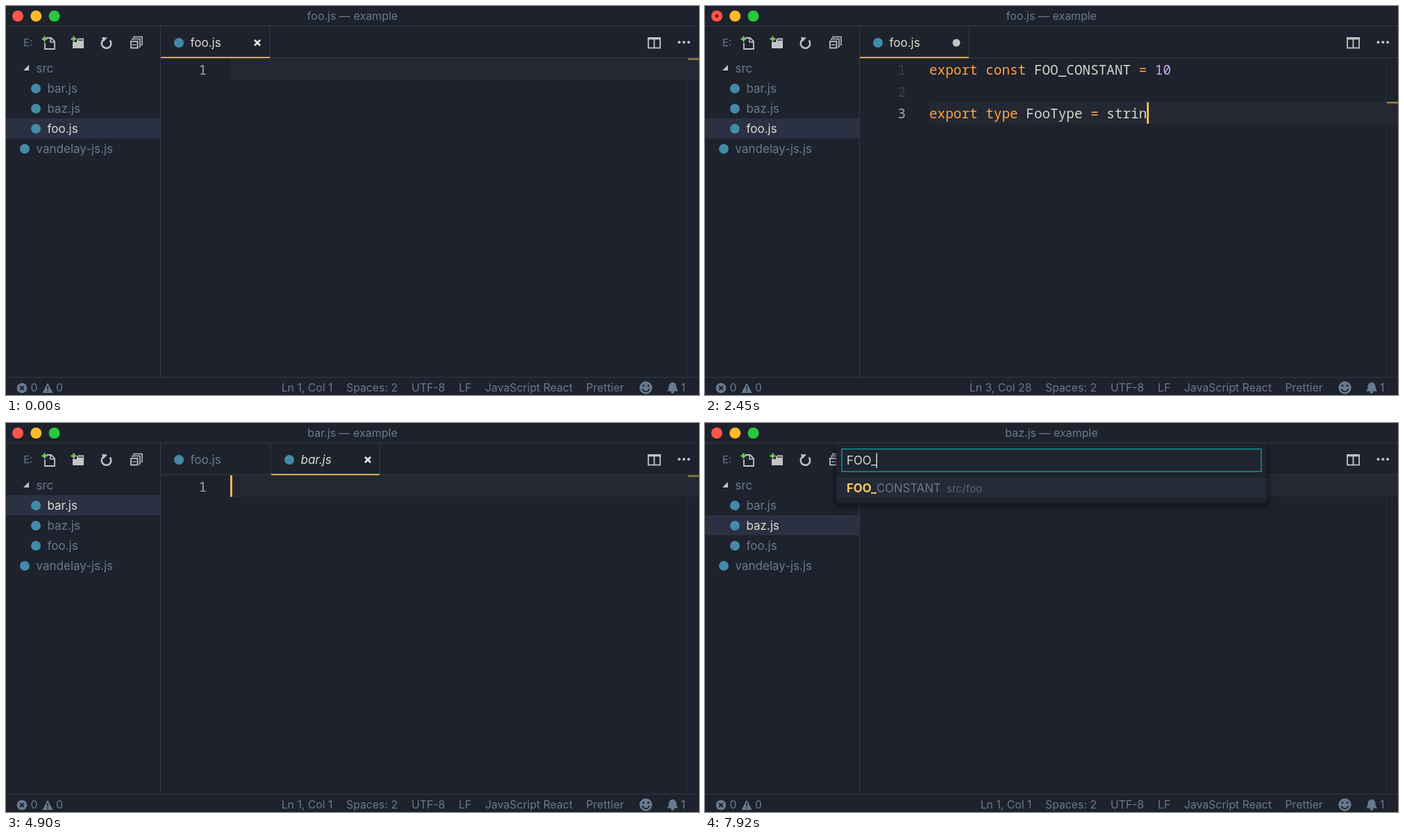
An HTML page with a canvas that plays this animation: 998 by 561 pixels, repeating every 7990 ms.

```html
<!DOCTYPE html>
<html lang="en">
<head>
<meta charset="utf-8">
<title>Editor session</title>
<style>
html, body { margin: 0; width: 100%; height: 100%; overflow: hidden; background: #1e222c; }
canvas { display: block; width: 998px; height: 561px; }
</style>
</head>
<body>
<canvas id="stage" width="998" height="561"></canvas>
<script>
const ctx = document.getElementById('stage').getContext('2d');
const LOOP = 7990, STEP = 70;
const UI = 'Inter, Roboto, sans-serif';
const MONO = '19.35px "Noto Sans Mono", "DejaVu Sans Mono", monospace';
const C = {
  bg: '#1e222c', line: '#242832', border: '#343a46', muted: '#687a90', bright: '#dedcd2',
  icon: '#c3c4c5', accent: '#ffcc5c', file: '#438aa8', green: '#7ccb63',
  selected: '#2b3043', focused: '#3a445a',
  fg: '#d8d6cc', key: '#ffa346', num: '#cda8ff', fn: '#ffd269', str: '#b4ea6e', type: '#57cae9'
};

// Each line: tokens, then [time, typed characters] keys.
const docs = {
  foo: [
    { tokens: [['export', 'key'], [' '], ['const', 'key'], [' FOO_CONSTANT '], ['=', 'key'], [' '], ['10', 'num']],
      keys: [[280, 1], [910, 19], [1050, 25], [1190, 30]] },
    { tokens: [], keys: [] },
    { tokens: [['export', 'key'], [' '], ['type', 'key'], [' FooType '], ['=', 'key'], [' '], ['string', 'type'], ['[]']],
      keys: [[1540, 1], [2450, 27], [2660, 30]] },
    { tokens: [], keys: [] },
    { tokens: [['export', 'key'], [' '], ['default', 'key'], [' () '], ['=>', 'key'], [' '], ['alert', 'fn'], ['('], ["'foo'", 'str'], [')']],
      keys: [[3080, 1], [3990, 31], [4130, 33]] }
  ],
  bar: [
    { tokens: [['export', 'key'], [' '], ['function', 'key'], [' '], ['doBar', 'fn'], ['() {']],
      keys: [[5460, 1], [5950, 21], [6090, 25]] },
    { tokens: [['  ']], keys: [[6160, 2]] },
    { tokens: [['}']], keys: [[6160, 1]] }
  ],
  baz: [{ tokens: [], keys: [] }]
};
const enters = { foo: [1330, 1400, 2800, 2870], bar: [6160], baz: [] };
const exportsList = [['foo', 'src/foo'], ['FOO_CONSTANT', 'src/foo'], ['FooType', 'src/foo'], ['doBar', 'src/bar']];

const between = (t, a, b) => t >= a && t < b;

function typed(keys, t) {
  if (!keys.length || t < keys[0][0]) return 0;
  for (let i = 1; i < keys.length; i++) {
    const [t0, n0] = keys[i - 1], [t1, n1] = keys[i];
    if (t < t1) return Math.round(n0 + (n1 - n0) * (t - t0) / (t1 - t0));
  }
  return keys[keys.length - 1][1];
}

function rect(x, y, w, h, color) {
  ctx.fillStyle = color;
  ctx.fillRect(x, y, w, h);
}
function circle(x, y, r, color) {
  ctx.fillStyle = color;
  ctx.beginPath();
  ctx.arc(x, y, r, 0, 7);
  ctx.fill();
}
function path(points, color, width, closed) {
  ctx.beginPath();
  points.forEach(([x, y]) => ctx.lineTo(x, y));
  if (closed) ctx.closePath();
  if (width) {
    ctx.strokeStyle = color;
    ctx.lineWidth = width;
    ctx.stroke();
  } else {
    ctx.fillStyle = color;
    ctx.fill();
  }
}
function frame(x, y, w, h, color, width) {
  ctx.strokeStyle = color;
  ctx.lineWidth = width;
  ctx.strokeRect(x, y, w, h);
}
// Draws text around a middle line and returns its right edge.
function text(s, x, mid, size, color = C.muted, align = 'left', style = '') {
  ctx.font = `${style} ${size}px ${UI}`;
  ctx.fillStyle = color;
  ctx.textAlign = align;
  ctx.fillText(s, x, mid + size * 0.355);
  return x + ctx.measureText(s).width;
}
function cross(x, y, r, color, width) {
  path([[x - r, y - r], [x + r, y + r]], color, width);
  path([[x - r, y + r], [x + r, y - r]], color, width);
}
function plus(x, y) {
  rect(x - 4, y - 1.2, 8, 2.4, C.green);
  rect(x - 1.2, y - 4, 2.4, 8, C.green);
}

function titleBar(s) {
  ['#ff554b', '#ffba2b', '#28c83f'].forEach((c, i) => circle(17 + i * 26.3, 14.5, 8, c));
  if (s.dirty) circle(17, 14.5, 2.4, '#7d0b08');
  text(`${s.file}.js — example`, 499, 14, 16, C.muted, 'center');
  rect(0, 28, 998, 1, C.border);
}

function sidebar(s) {
  text('E:', 25, 53, 15);
  path([[58, 46], [65, 46], [70, 51], [70, 62], [56, 62], [56, 53]], C.icon, 1.8);
  path([[64, 46], [64, 52], [70, 52]], C.icon, 1.6);
  plus(55.5, 47.5);
  path([[96, 52], [102, 52], [102, 49], [104, 46.5], [112, 46.5], [112, 61], [96, 61]], C.icon);
  rect(104, 48.5, 7, 1.3, C.bg);
  plus(97.5, 47.5);
  ctx.strokeStyle = C.icon;
  ctx.lineWidth = 2.5;
  ctx.beginPath();
  ctx.arc(144.5, 54, 6.8, -0.7, 4.1);
  ctx.stroke();
  path([[138, 45], [146, 45.5], [140.5, 51.5]], C.icon);
  path([[184, 46], [184, 44.5], [196, 44.5], [196, 56], [194.5, 56]], C.icon, 1.5);
  path([[182, 49], [182, 47.5], [193, 47.5], [193, 59], [191.5, 59]], C.icon, 1.5);
  frame(180, 51, 9.5, 9.5, C.icon, 1.8);
  rect(182, 55, 5.5, 1.7, '#78a9d8');

  path([[33, 85], [33, 93], [25, 93]], C.icon);
  text('src', 43.5, 90, 17);
  ['bar', 'baz', 'foo'].forEach((name, i) => {
    const y = 119 + i * 29, on = name === s.file;
    if (on) rect(0, y - 15, 222, 29, s.sideFocus ? C.focused : C.selected);
    circle(43, y, 7, C.file);
    text(name + '.js', 59.5, y, 17, on ? C.bright : C.muted);
  });
  circle(27, 206, 7, C.file);
  text('vandelay-js.js', 43.5, 206, 17);
  rect(222, 29, 1, 506, C.border);
}

function tabs(s) {
  rect(223, 74, 775, 1, C.border);
  s.tabs.forEach((name, i) => {
    const x = [223, 382, 540][i], on = name === s.file;
    const last = i === s.tabs.length - 1;
    const end = last ? [380, 538, 696][i] : [381, 540][i];
    circle(x + 26, 53, 7, C.file);
    text(name + '.js', x + 42.5, 53, 17, on ? C.bright : C.muted, 'left', on && s.preview ? 'italic' : '');
    rect(end - 0.5, 29, 1, 45, C.border);
    if (!on) return;
    rect(x, 73.5, end - x, 1.7, C.accent);
    if (s.dirty) circle(x + 139, 53, 5.5, C.icon);
    else cross(x + 139, 53, 4, '#e4e4e2', 2.6);
  });
  frame(925, 46, 17, 14.5, C.icon, 1.8);
  rect(924, 45, 19, 3.4, C.icon);
  rect(932.6, 46, 1.8, 14, C.icon);
  for (let i = 0; i < 3; i++) circle(969.5 + i * 6.8, 52.3, 2, C.icon);
}

function codeLine(line, n, x0, mid, adv) {
  let at = 0;
  for (const [word, kind = 'fg'] of line.tokens) {
    const part = word.slice(0, Math.max(0, n - at)), x = x0 + at * adv;
    const partial = part.length < word.length && (kind === 'key' || kind === 'type');
    ctx.fillStyle = C[partial ? 'fg' : kind];
    if (part === '=>') {
      path([[x + 1, mid - 2.3], [x + 17, mid - 2.3]], C.key, 1.8);
      path([[x + 1, mid + 3], [x + 17, mid + 3]], C.key, 1.8);
      path([[x + 13.5, mid - 6], [x + 21, mid + 0.3], [x + 13.5, mid + 6.6]], C.key, 1.9);
    } else if (part.trim()) {
      ctx.fillText(part, x, mid + 7);
    }
    at += word.length;
  }
}

function editor(s, t) {
  const top = i => 75 + i * 31.6;
  rect(323, top(s.row), 675, 31.6, C.line);
  rect(981, 75, 1, 460, '#292d37');
  if (!s.sideFocus && !s.palette) rect(982, top(s.row) + (s.row ? 0 : 0.5), 16, 2.2, s.row ? '#b98a43' : '#9e8243');
  ctx.font = MONO;
  const adv = ctx.measureText('0').width;
  const lines = docs[s.file];
  const shown = s.file === 'bar' && s.row ? 3 : s.row + 1;
  for (let i = 0; i < shown; i++) {
    const mid = top(i) + 17, n = typed(lines[i].keys, t);
    ctx.font = MONO;
    ctx.textAlign = 'right';
    ctx.fillStyle = i === s.row ? '#a3a7ad' : '#3b4250';
    ctx.fillText(i + 1, 289, mid + 7);
    ctx.textAlign = 'left';
    codeLine(lines[i], n, 323, mid, adv);
    // Brackets and quotes close themselves while typing.
    if (s.file === 'foo' && i === 4 && between(n, 27, 33)) {
      const quote = between(n, 28, 32) ? "'" : '';
      ctx.fillStyle = C.str;
      ctx.fillText(quote, 323 + n * adv, mid + 7);
      ctx.fillStyle = C.fg;
      ctx.fillText(')', 323 + (n + quote.length) * adv, mid + 7);
    }
    if (i === s.row && s.cursor) rect(323 + n * adv, top(i) + 0.5, 2.7, 31, C.accent);
  }
}

function statusBar(s, t) {
  rect(0, 535, 998, 1, C.border);
  const size = 15.8, mid = 550;
  const label = (str, x, align) => text(str, x, mid, size, C.muted, align);
  circle(23, 551, 7.3, C.muted);
  cross(23, 551, 2.8, C.bg, 2);
  label('0', 35.5);
  path([[60, 543.5], [67.5, 558], [52.5, 558]], C.muted);
  rect(59.2, 548, 1.7, 5, C.bg);
  rect(59.2, 554.5, 1.7, 1.7, C.bg);
  label('0', 72);
  const col = typed(docs[s.file][s.row].keys, t) + 1;
  label(`Ln ${s.row + 1}, Col ${col}`, 470.5, 'right');
  label('Spaces: 2', 490);
  label('UTF-8', 584);
  label('LF', 652);
  label('JavaScript React', 690);
  label('Prettier', 835.5);
  circle(921.5, 550.5, 9.2, C.muted);
  circle(918, 547.5, 1.5, C.bg);
  circle(925, 547.5, 1.5, C.bg);
  ctx.strokeStyle = C.bg;
  ctx.lineWidth = 1.7;
  ctx.beginPath();
  ctx.arc(921.5, 551, 5, 0.2, 2.94);
  ctx.stroke();
  ctx.fillStyle = C.muted;
  ctx.beginPath();
  ctx.moveTo(952, 555.5);
  ctx.quadraticCurveTo(954.5, 553, 954.5, 548.5);
  ctx.arc(960, 548, 5.3, Math.PI, 0);
  ctx.quadraticCurveTo(965.5, 553, 968, 555.5);
  ctx.fill();
  circle(960, 556.5, 2.4, C.muted);
  label('1', 972);
}

function palette(query) {
  const items = exportsList.filter(([name]) => name.toLowerCase().startsWith(query.toLowerCase()));
  ctx.save();
  ctx.beginPath();
  ctx.rect(0, 29, 998, 532);
  ctx.clip();
  ctx.shadowColor = 'rgba(0,0,0,.65)';
  ctx.shadowBlur = 9;
  ctx.shadowOffsetY = 2;
  rect(189, 29, 620, 58 + 29 * items.length, C.bg);
  ctx.restore();
  rect(197, 37, 604, 33, '#20242e');
  frame(197, 37.5, 604, 32.5, '#159aa3', 1.4);
  const caret = text(query, 204, 54.5, 16.8, C.bright);
  rect(caret, 43.5, 1.4, 21.5, '#e6e5df');
  items.forEach(([name, from], i) => {
    const y = 79 + i * 29, mid = y + 15, n = query.length;
    if (!i) rect(189, y, 620, 29, '#242a36');
    let x = text(name.slice(0, n), 204, mid, 16.8, C.accent, 'left', '700');
    x = text(name.slice(n), x, mid, 16.8);
    text(from, x + 8, mid + 0.7, 15.3, '#566477');
  });
}

function stateAt(t) {
  const file = t < 4690 ? 'foo' : t < 6870 ? 'bar' : 'baz';
  const open = t >= 7430;
  const sideFocus = between(t, 4690, 4820) || between(t, 6870, 7430);
  return {
    file, sideFocus,
    tabs: ['foo', 'bar', 'baz'].slice(0, { foo: 1, bar: 2, baz: 3 }[file]),
    row: enters[file].filter(e => t >= e).length,
    dirty: between(t, 280, 4270) || between(t, 5460, 6230),
    preview: between(t, 4690, 5460) || file === 'baz',
    cursor: t >= 70 && !sideFocus && !open && !between(t, 5320, 5460) && !between(t, 6300, 6370),
    palette: open,
    query: 'FOO_'.slice(0, Math.max(0, Math.floor((t - 7710) / STEP) + 1))
  };
}

function draw(now) {
  const elapsed = Math.max(0, now - start) % LOOP;
  // Input lands on a fixed beat, with one long hold before the last file opens.
  const base = elapsed < 6870 ? 0 : 6870;
  const t = base + Math.floor((elapsed - base) / STEP) * STEP;
  const s = stateAt(t);
  rect(0, 0, 998, 561, C.bg);
  titleBar(s);
  sidebar(s);
  editor(s, t);
  tabs(s);
  statusBar(s, t);
  if (s.palette) palette(s.query);
  requestAnimationFrame(() => draw(performance.now()));
}
const start = performance.now();
draw(start);
</script>
</body>
</html>
```
